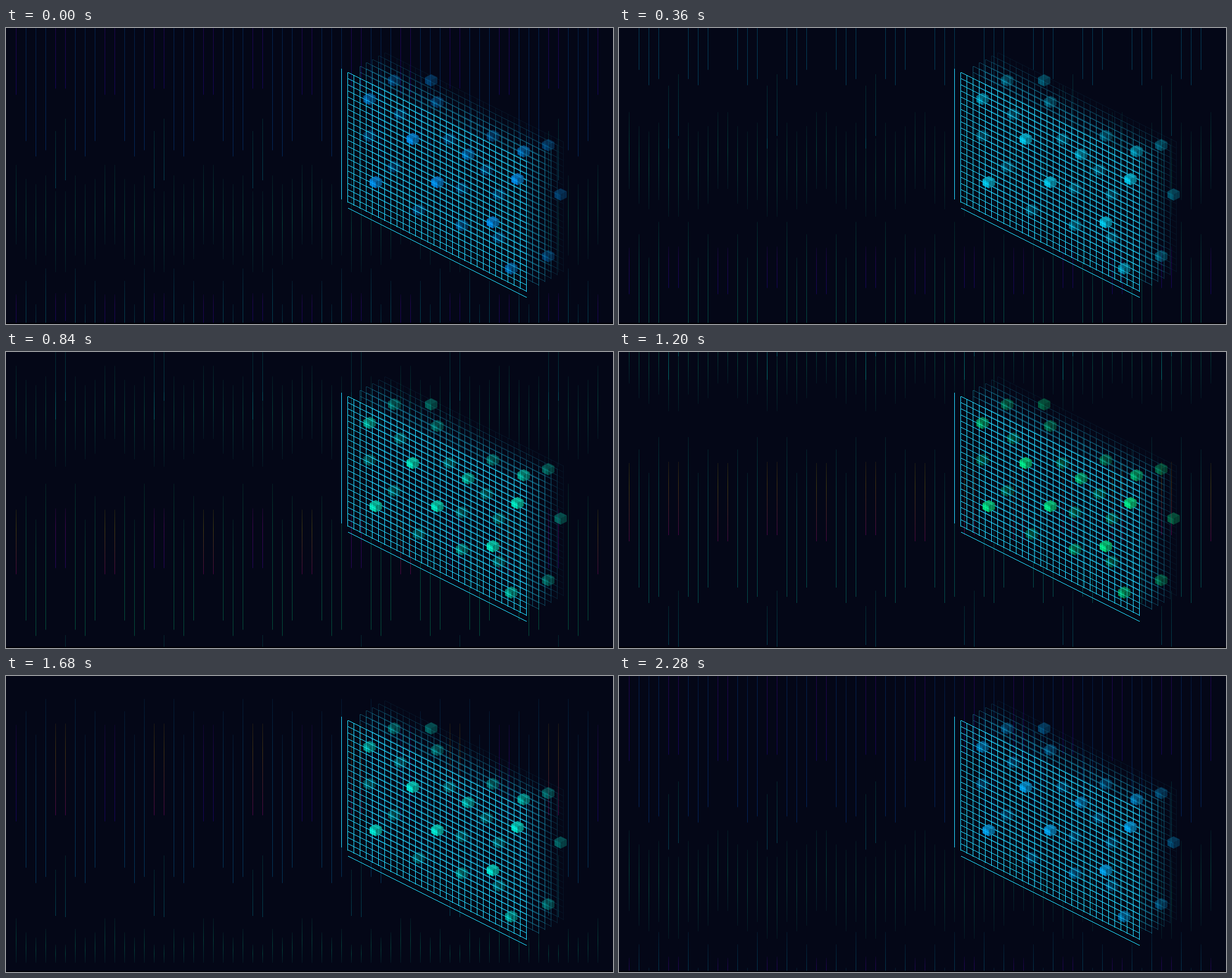
An HTML page with a canvas that plays this animation: 985 by 480 pixels, repeating every 2400 ms.

```html
<!DOCTYPE html>
<html lang="en">
<head>
<meta charset="utf-8">
<title>Neon rain and grid</title>
<style>
html, body { margin: 0; width: 100%; height: 100%; overflow: hidden; background: #040717; }
canvas { display: block; }
</style>
</head>
<body>
<canvas id="stage" width="985" height="480"></canvas>
<script>
const ctx = document.getElementById('stage').getContext('2d');
const STEP = 120, STEPS = 20;
const LINE = '#22d3fb';

// Streak columns come in mirrored pairs: head and tail heights at step 0,
// delay of the faint follower, and the step at which the hue flares.
const PAIRS = [
  { cols: [0, 1], head: 432, tail: 485, lag: -0.6, flare: 8.5 },
  { cols: [2, 9], head: 410, tail: 560, lag: 0.2 },
  { cols: [3, 8], head: 448, tail: 585, lag: 0.5 },
  { cols: [4, 7], head: 390, tail: 575, lag: 0 },
  { cols: [5, 6], head: 430, tail: 475, lag: 0.9, flare: 12 }
];

const GRID = { x: 554, y: 72, w: 290, h: 210, cell: 10 };

// Cube centres grouped by opacity.
const FAR_CUBES = [
  { alpha: 0.34, at: [[630, 85], [690, 85], [700, 120], [790, 175], [880, 190], [900, 270], [880, 370]] },
  { alpha: 0.32, at: [[640, 140], [720, 180], [780, 230], [590, 175], [630, 225], [740, 260],
                      [800, 270], [670, 295], [800, 340]] }
];
const NEAR_CUBES = [
  { alpha: 0.42, at: [[740, 320]] },
  { alpha: 0.56, at: [[590, 115], [750, 205], [840, 200], [820, 390]] },
  { alpha: 0.82, at: [[660, 180], [600, 250], [700, 250], [830, 245], [790, 315]] }
];

function streak(cols, top, bottom, stops) {
  if (bottom <= top || bottom <= 0 || top >= 480) return;
  const fill = ctx.createLinearGradient(0, top, 0, bottom);
  stops.forEach(([pos, hue, alpha]) => fill.addColorStop(pos, `hsla(${hue}, 100%, 50%, ${alpha})`));
  ctx.fillStyle = fill;
  for (let col = 1; col <= 60; col++) {
    if (cols.includes(col % 10)) ctx.fillRect(col * 16, top, 1, bottom - top);
  }
}

function mainHues(flare, n) {
  if (!flare) {
    const hue = 185 - 30 * Math.sin(Math.PI * n / 12);
    return [hue, hue];
  }
  const swing = 155 * Math.max(0, 1 - ((n - flare) / 5.5) ** 2);
  return [268 + swing, 255 + 0.45 * swing];
}

// The tail speeds up as the streak leaves the stage.
function drawMain({ cols, head, tail, flare }, n) {
  if (n < -2 || n > 27) return;
  const [topHue, bottomHue] = mainHues(flare, n);
  streak(cols, head - 25.2 * n, tail - 17.8 * n - 2.3 * Math.max(0, n - 17) ** 2,
    [[0, topHue, 0.1], [0.3, topHue, 0.22], [1, bottomHue, 0.27]]);
}

function drawFaint({ cols, lag }, n) {
  const age = n - 14 - lag;
  if (n < 12) return;
  streak(cols, 410 - 28.5 * age, Math.min(465, 549 - 30 * age),
    [[0, 165, 0.08], [0.5, 160, 0.22], [1, 170, 0.07]]);
}

function drawShort(n) {
  if (n < 6) return;
  const teal = [[0, 170, 0.12], [1, 185, 0.24]];
  streak([5], 657 - 24.5 * n, 690 - 21.5 * n, teal);
  streak([6], 627 - 24 * n, 727 - 24 * n, teal);
}

// Two pixels across for each pixel down.
function slope(g, x, y, w) {
  for (let i = 0; i <= w; i += 2) g.fillRect(x + i, y + i / 2, Math.min(2, w + 1 - i), 1);
}

function makeGrid() {
  const c = document.createElement('canvas');
  c.width = GRID.w + 1;
  c.height = GRID.h + GRID.w / 2 + 1;
  const g = c.getContext('2d');
  g.fillStyle = LINE;
  for (let x = 0; x <= GRID.w; x += GRID.cell) g.fillRect(x, x / 2, 1, GRID.h + 1);
  for (let y = 0; y <= GRID.h; y += GRID.cell) slope(g, 1, y, GRID.w - 1);
  return c;
}
const grid = makeGrid();

function face(points, color) {
  ctx.fillStyle = color;
  ctx.beginPath();
  points.forEach(([x, y]) => ctx.lineTo(x, y));
  ctx.fill();
}

function drawCubes(groups, hue) {
  for (const { alpha, at } of groups) {
    for (const [x, y] of at) {
      ctx.save();
      ctx.translate(x, y);
      ctx.globalAlpha = alpha;
      face([[0, -10], [10, -5], [0, 0], [-10, -5]], `hsl(${hue}, 90%, 42%)`);
      face([[-10, -5], [0, 0], [0, 10], [-10, 5]], `hsl(${hue}, 100%, 50%)`);
      face([[10, -5], [0, 0], [0, 10], [10, 5]], `hsl(${hue}, 90%, 33%)`);
      ctx.restore();
    }
  }
}

function draw(n) {
  ctx.fillStyle = '#040717';
  ctx.fillRect(0, 0, 985, 480);
  for (const phase of [n - STEPS, n, n + STEPS]) {
    for (const pair of PAIRS) {
      drawFaint(pair, phase);
      drawMain(pair, phase);
    }
    drawShort(phase);
  }
  ctx.fillStyle = '#000006';
  ctx.fillRect(0, 478, 985, 2);

  for (let k = 6; k >= 2; k--) {
    ctx.globalAlpha = 0.48 - 0.07 * k;
    ctx.drawImage(grid, GRID.x + 10 * k, GRID.y - Math.floor(5.4 * k));
  }
  ctx.globalAlpha = 1;

  const hue = 153 + 51 * Math.abs(1 - n * 2 / STEPS);
  drawCubes(FAR_CUBES, hue);
  ctx.drawImage(grid, GRID.x, GRID.y);
  ctx.fillStyle = LINE;
  ctx.fillRect(GRID.x - 10, GRID.y - 6, 1, GRID.h + 2);
  slope(ctx, GRID.x + 1, GRID.y + GRID.h + 10, GRID.w - 1);
  drawCubes(NEAR_CUBES, hue);
}

const start = performance.now();
function tick() {
  draw(Math.floor((performance.now() - start) / STEP) % STEPS);
  requestAnimationFrame(tick);
}
tick();
</script>
</body>
</html>
```
